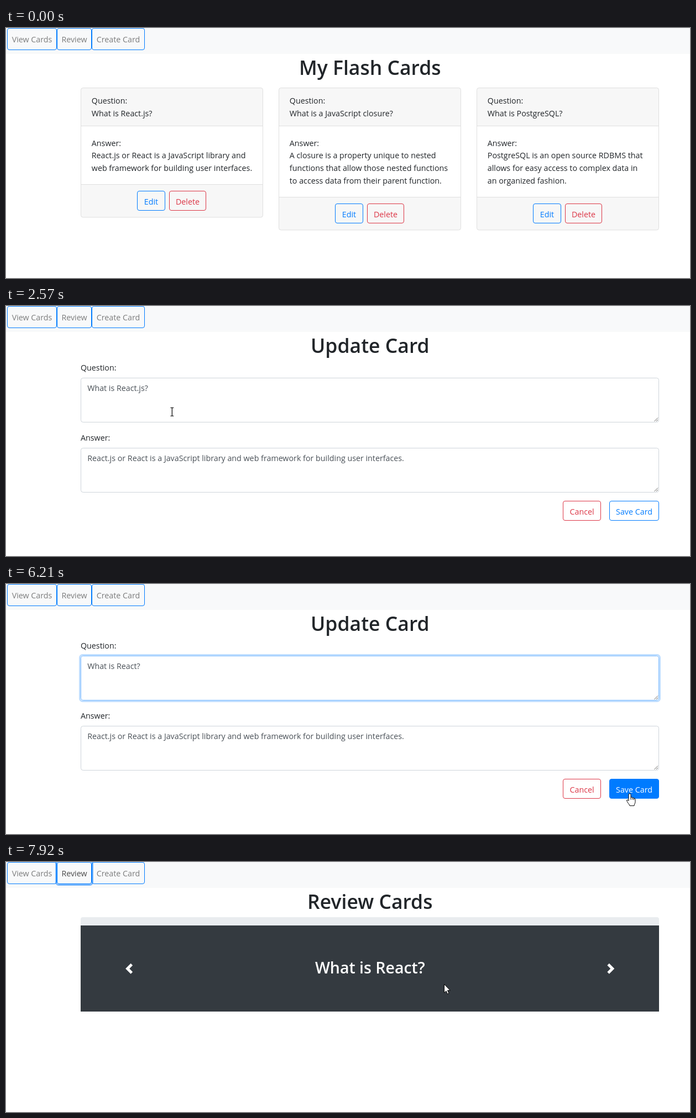
These frames come from a looping animation (1237 px wide and 453 px high, 8 s). An HTML page:

```html
<!DOCTYPE html>
<html lang="en">
<head>
<meta charset="utf-8">
<title>Flash Cards</title>
<style>
  html, body { margin: 0; width: 100%; height: 100%; overflow: hidden; background: #fff; }
  svg { display: block; width: 1237px; height: 453px; font: 14.27px "Open Sans", "Noto Sans", sans-serif; }
  text { fill: #212529; white-space: pre; }
  .title { font-size: 35.5px; font-weight: 600; text-anchor: middle; }
  .slide { font-size: 28.5px; font-weight: 600; text-anchor: middle; fill: #fff; }
  .label { text-anchor: middle; }
  .field { fill: #495057; }
  .beam { mix-blend-mode: difference; }
</style>
</head>
<body>
<svg id="stage" viewBox="0 0 1237 453"></svg>
<script>
const LOOP = 8000;
const BLUE = '#007bff', RED = '#dc3545', BORDER = '#dfdfdf', TINT = '#f7f7f7';
const stage = document.getElementById('stage');

function el(parent, tag, attrs = {}, content = '') {
  const node = document.createElementNS('http://www.w3.org/2000/svg', tag);
  set(node, attrs);
  node.textContent = content;
  return parent.appendChild(node);
}
function set(node, attrs) {
  for (const key in attrs) node.setAttribute(key, attrs[key]);
}
const show = (node, on) => set(node, { visibility: on ? 'visible' : 'hidden' });
const group = () => el(stage, 'g');
const rect = (parent, x, y, width, height, attrs) => el(parent, 'rect', { x, y, width, height, ...attrs });
const text = (parent, x, y, content, cls = '') => el(parent, 'text', { x, y, class: cls }, content);
const path = (parent, d, attrs) => el(parent, 'path', { d, ...attrs });
const mix = (a, b, k) => `color-mix(in srgb, ${b} ${k * 100}%, ${a})`;
const ramp = (t, start, length = 150) => Math.min(1, Math.max(0, (t - start) / length));
const pulse = (t, on, off) => ramp(t, on) * (1 - ramp(t, off));
const between = (t, a, b) => t >= a && t < b;

function button(parent, x, y, w, h, label, color, baseline = y + 24) {
  const box = rect(parent, x, y, w, h, { rx: 3.5, fill: color, 'fill-opacity': 0, stroke: color });
  const ring = rect(parent, x - 2, y - 2, w + 4, h + 4,
    { rx: 5, fill: 'none', stroke: color, 'stroke-width': 3, 'stroke-opacity': 0 });
  const caption = text(parent, x + w / 2, baseline, label, 'label');
  caption.style.fill = color;
  return { box, ring, caption, color };
}
function paint(btn, hover, focus = 0) {
  set(btn.box, { 'fill-opacity': hover });
  set(btn.ring, { 'stroke-opacity': focus * 0.5 });
  btn.caption.style.fill = mix(btn.color, '#fff', hover);
}

function card(parent, x, question, answer) {
  const top = 108.5, head = 177.5, w = 329;
  const foot = Math.floor(238 + answer.length * 22.7) + 0.5;
  const h = foot + 59.5 - top;
  rect(parent, x, top, w, h, { rx: 3.8, fill: TINT });
  rect(parent, x, head, w, foot - head, { fill: '#fff' });
  path(parent, `M${x} ${head}h${w}M${x} ${foot}h${w}`, { stroke: BORDER });
  rect(parent, x, top, w, h, { rx: 3.8, fill: 'none', stroke: BORDER });
  text(parent, x + 19.3, 137, 'Question:');
  const q = text(parent, x + 19.3, 159.6, question);
  text(parent, x + 19.3, 213.5, 'Answer:');
  answer.forEach((row, i) => text(parent, x + 19.3, 236.2 + i * 22.7, row));
  const edit = button(parent, x + 102, foot + 12, 50, 35, 'Edit', BLUE);
  button(parent, x + 160, foot + 12, 66, 35, 'Delete', RED);
  return { q, edit };
}

function textarea(parent, y, content) {
  const ring = rect(parent, 133.5, y - 2, 1049, 84,
    { rx: 5, fill: 'none', stroke: BLUE, 'stroke-width': 3, 'stroke-opacity': 0 });
  const box = rect(parent, 135.5, y, 1045, 80, { rx: 3.8, fill: '#fff', stroke: '#ced4da' });
  path(parent, `M1172.5 ${y + 78.5}l6.5-6.5m-3 6.5l3-3`, { stroke: '#666' });
  const value = text(parent, 147.2, y + 23.6, content, 'field');
  return { ring, box, value };
}

rect(stage, 0, 0, 1237, 453, { fill: '#fff' });

// Card list
const home = group();
text(home, 658.3, 85.3, 'My Flash Cards', 'title');
const first = card(home, 135.5, 'What is React.js?', [
  'React.js or React is a JavaScript library and',
  'web framework for building user interfaces.']);
card(home, 493.5, 'What is a JavaScript closure?', [
  'A closure is a property unique to nested',
  'functions that allow those nested functions',
  'to access data from their parent function.']);
card(home, 851.5, 'What is PostgreSQL?', [
  'PostgreSQL is an open source RDBMS that',
  'allows for easy access to complex data in',
  'an organized fashion.']);

// Edit form
const form = group();
text(form, 658.3, 85.3, 'Update Card', 'title');
text(form, 135, 117.4, 'Question:');
const question = textarea(form, 130.5, '');
text(form, 135, 243.8, 'Answer:');
textarea(form, 257.5, 'React.js or React is a JavaScript library and web framework for building user interfaces.');
const cancel = button(form, 1007.5, 353.5, 68, 35, 'Cancel', RED);
const save = button(form, 1091.5, 353.5, 89, 35, 'Save Card', BLUE);
const squiggle = path(form, 'M201 156' + 'l2 -2l2 2'.repeat(12), { fill: 'none', stroke: '#f00', 'stroke-width': 1.1 });
const caret = rect(form, 0, 138, 1, 20, { fill: '#222' });

// Review carousel
const review = group();
text(review, 658.3, 85.3, 'Review Cards', 'title');
path(review, 'M135 115v-11q0-4 4-4h1038q4 0 4 4v11z', { fill: '#e9ecef' });
rect(review, 135, 115, 1046, 156, { fill: '#343a40' });
text(review, 658.3, 202, 'What is React?', 'slide');
const chevron = (x, d) => path(review, d, { fill: '#fff', transform: `translate(${x} 183.8) scale(2.36)` });
chevron(213.2, 'M5.25 0l-4 4 4 4 1.5-1.5-2.5-2.5 2.5-2.5-1.5-1.5z');
chevron(1084.4, 'M2.75 0l-1.5 1.5 2.5 2.5-2.5 2.5 1.5 1.5 4-4-4-4z');

// Navigation
const nav = group();
rect(nav, 0, 0, 1237, 47, { fill: '#f8f9fa' });
function link(x, w, label) {
  const btn = button(nav, x, 0.5, w, 39, label, BLUE, 25.5);
  btn.caption.style.fill = 'rgba(0,0,0,.5)';
  return btn;
}
link(2.5, 89, 'View Cards');
link(155.5, 95, 'Create Card');
const reviewLink = link(92.5, 62, 'Review');

// Pointers, each drawn around its hot spot
const outline = { fill: '#fff', stroke: '#000', 'stroke-linejoin': 'round' };
const pointers = {
  arrow: path(stage, 'M.5 .5V16L4 12.7L6.4 18L8.9 17L6.5 11.7H11.3Z', outline),
  hand: path(stage, 'M-2 2a2 2 0 0 1 4 0v5l1-.5a2 2 0 0 1 2 1a2 2 0 0 1 2.5 1a2 2 0 0 1 2.5 1.5v5c0 3-2 4-2 7h-8' +
    'c0-2-5-6-5.5-10q2-2 3.5 1zM2 7v4m3-3.5v3.5m2.5-2.5v3', outline),
  beam: path(stage, 'M-3 -7.5h6M-3 7.5h6M0-7.5v15', { class: 'beam', fill: 'none', stroke: '#fff', 'stroke-width': 1.2 })
};

// time, x, y, pointer from then on
const moves = [
  [0, 995, 456, 'arrow'], [60, 995, 456, 'arrow'], [70, 989, 443, 'arrow'], [250, 760, 418, 'arrow'], [410, 592, 406, 'arrow'],
  [620, 588, 405, 'arrow'], [900, 410, 360, 'arrow'], [1140, 286, 324, 'hand'], [1320, 274, 319, 'hand'],
  [1780, 274, 319, 'beam'], [2000, 274, 319, 'beam'], [2100, 272, 337, 'beam'], [2250, 292, 300, 'beam'],
  [2420, 311, 235, 'beam'], [2640, 295.5, 172, 'beam'], [5350, 295.5, 172, 'beam'], [5440, 480, 225, 'arrow'],
  [5670, 1010, 385, 'arrow'], [5760, 1010, 385, 'arrow'], [5835, 1081, 372, 'arrow'],
  [5900, 1108, 376, 'hand'], [6080, 1128, 381, 'hand'], [6400, 1128, 378, 'hand'], [6440, 1120, 374, 'arrow'],
  [6600, 880, 285, 'arrow'], [6850, 330, 100, 'arrow'], [6980, 156, 44, 'arrow'], [7050, 147, 36.5, 'hand'],
  [7140, 147, 36.5, 'hand'], [7250, 141, 29.5, 'hand'], [7510, 141, 29.5, 'hand'], [7560, 210, 55, 'arrow'],
  [7740, 560, 160, 'arrow'], [7910, 792, 221, 'arrow'], [LOOP, 792, 221, 'arrow']
];
const typing = [[0, 'What is React.js?'], [3725, 'What is React.js'], [3805, 'What is React.j'],
  [3885, 'What is React.'], [4035, 'What is React'], [4965, 'What is React?']];

function movePointer(t) {
  const i = moves.findIndex(m => m[0] > t);
  const [t0, x0, y0, kind] = moves[i - 1], [t1, x1, y1] = moves[i];
  const k = (t - t0) / (t1 - t0);
  const at = `translate(${x0 + (x1 - x0) * k} ${y0 + (y1 - y0) * k})`;
  for (const name in pointers) {
    show(pointers[name], name === kind);
    set(pointers[name], { transform: at });
  }
}

function render(t) {
  const onForm = between(t, 1865, 6440), onReview = t >= 7440;
  show(home, !onForm && !onReview);
  show(form, onForm);
  show(review, onReview);

  first.q.textContent = t < 3000 ? 'What is React.js?' : 'What is React?';
  paint(first.edit, t < 1865 ? ramp(t, 1150) : 0, t < 1865 ? ramp(t, 1600) : 0);

  const value = typing.findLast(step => step[0] <= t)[1];
  if (question.value.textContent !== value) question.value.textContent = value;
  const focus = pulse(t, 3010, 6220);
  set(question.ring, { 'stroke-opacity': focus * 0.25 });
  question.box.style.stroke = mix('#ced4da', '#80bdff', focus);
  show(squiggle, onForm && between(t, 3100, 3725));
  const blink = between(t, 3030, 3570) || between(t, 4080, 4600) || between(t, 4965, 5500);
  show(caret, onForm && blink);
  if (blink) set(caret, { x: Math.round(147 + question.value.getComputedTextLength()) });

  paint(cancel, 0.6 * ramp(t, 5760, 50) * (1 - ramp(t, 5810, 80)));
  paint(save, ramp(t, 5890), ramp(t, 6220));

  set(reviewLink.box, { 'fill-opacity': pulse(t, 7095, 7530) });
  set(reviewLink.ring, { 'stroke-opacity': 0.5 * ramp(t, 7280) });
  reviewLink.caption.style.fill = `rgba(0,0,0,${0.5 + 0.2 * ramp(t, 7095)})`;

  movePointer(t);
}

const start = performance.now();
function tick() {
  render((performance.now() - start) % LOOP);
  requestAnimationFrame(tick);
}
tick();
</script>
</body>
</html>
```
